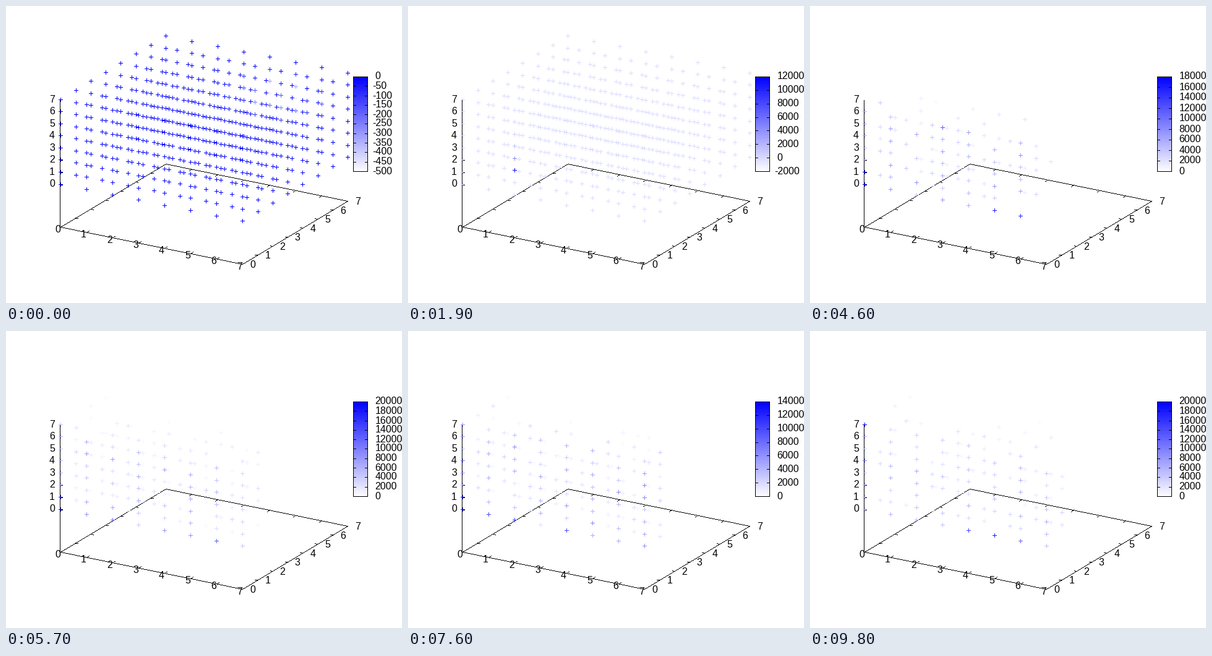
A matplotlib script for the animation above (9.9 s loop, 640 by 480 pixels).

```python
import math

import matplotlib.pyplot as plt
import numpy as np
from matplotlib.animation import FuncAnimation
from matplotlib.collections import LineCollection

W, H, DPI = 640, 480, 100
FRAMES, INTERVAL = 99, 100
N = 8
PX = 72 / DPI
FONT = dict(family="Liberation Sans", size=16 * PX, color="black", va="baseline")
X, Y, Z = np.indices((N, N, N))


def dip():
    """A small hollow near the back wall."""
    r2 = (X - 4.5) ** 2 + (Y - 7) ** 2 + (Z - 4.2) ** 2
    return np.where(r2 < 5, -560 * np.exp(-r2 / 1.6), 0)


def spike():
    """A column that fades upwards, with the hollow half filled."""
    column = (X == 2) & (Y == 0) & (Z >= 2)
    return .6 * dip() + np.where(column, 11600 * .38 ** (Z - 2.0), 0)


def cloud(seed, level, fade, low, high, hot):
    """Random cells thinning out with depth, plus (x, z, value) peaks in front."""
    rng = np.random.default_rng(seed)
    inside = (X >= low) & (X <= high) & (Z >= low) & (Z <= high) & (X + Y <= 8)
    filled = rng.random(X.shape) < .85 - .25 * Y
    field = level * fade ** Y * rng.uniform(.6, 1.4, X.shape) * (inside & filled)
    for x, z, value in hot:
        field[x, 0, z] = value
    return 1000 * field


STATES = [
    (0, dip()),
    (19, spike()),
    (29, cloud(1, 1.6, .6, 1, 6,
               [(3, 6, 8.9), (4, 6, 6.6), (3, 5, 3.6), (6, 3, 4.2), (6, 5, 4)])),
    (46, cloud(2, 5.5, .55, 0, 6,
               [(0, 0, 17.6), (0, 1, 17), (3, 6, 11.5), (5, 0, 16), (6, 0, 15)])),
    (67, cloud(3, 5.5, .5, 0, 7,
               [(0, 0, 17.8), (0, 1, 16.5), (1, 0, 13), (2, 0, 15), (4, 0, 12)])),
    (85, cloud(4, 3.2, .65, 0, 7,
               [(0, 4, 13.8), (1, 4, 8), (7, 5, 11), (7, 4, 8), (4, 0, 6)])),
    (98, cloud(5, 4.6, .55, 0, 7,
               [(0, 7, 19.6), (5, 0, 17.5), (4, 0, 15), (6, 0, 12), (0, 4, 10)])),
]
DELAY = np.random.default_rng(4).random(X.shape)


def field_at(n):
    """Blend neighbouring states, each cell with its own delay and flicker."""
    for (t0, a), (t1, b) in zip(STATES, STATES[1:]):
        if n <= t1:
            break
    u = (n - t0) / (t1 - t0)
    s = np.clip((u - .2 * DELAY) / .8, 0, 1)
    noise = np.random.default_rng(n).uniform(-1, 1, X.shape)
    return (a + (b - a) * s) * (1 + .25 * math.sin(math.pi * u) * noise)


def tic_step(span):
    power = 10 ** math.floor(math.log10(span))
    density = 20 / (span / power)
    for limit, step in ((40, .05), (20, .1), (10, .2), (4, .5), (1, 1)):
        if density > limit:
            return step * power
    return 2 * power


def pixel_line(x0, y0, x1, y1):
    """Segments that cover exactly the pixels of a one-pixel line."""
    if x0 == x1:
        return [[(x0 + .5, y0), (x0 + .5, y1 + 1)]]
    cols = np.arange(round(min(x0, x1)), round(max(x0, x1)) + 1)
    rows = np.floor(y0 + (cols - x0) * (y1 - y0) / (x1 - x0) + .5) + .5
    return [[(c, r), (c + 1, r)] for c, r in zip(cols, rows)]


fig = plt.figure(figsize=(W / DPI, H / DPI), dpi=DPI, facecolor="white")
ax = fig.add_axes([0, 0, 1, 1])


def add_segments(segments, zorder):
    group = LineCollection(segments, colors="black", linewidths=PX,
                           capstyle="butt", zorder=zorder)
    group.set_snap(False)
    return ax.add_collection(group, autolim=False)


def label(x, y, s, ha="center"):
    return ax.text(x - 1, y + 5.5, s, ha=ha, zorder=5, **FONT)


# Base frame and vertical axis
frame = []
for edge in ((88, 357, 382, 417), (382, 417, 552, 315),
             (88, 357, 258, 255), (258, 255, 552, 315), (87, 151, 87, 357)):
    frame += pixel_line(*edge)

for k in range(N):
    dx, dy = 42 * k, 60 * k / 7
    ex, ey = 170 * k / 7, -102 * k / 7
    if 0 < k < N - 1:
        frame += pixel_line(88 + dx, 357 + dy, 92 + dx, 354.6 + dy)
        frame += pixel_line(258 + dx, 255 + dy, 254 + dx, 257.4 + dy)
        frame += pixel_line(88 + ex, 357 + ey, 92 + ex, 357.8 + ey)
        frame += pixel_line(382 + ex, 417 + ey, 378 + ex, 416.2 + ey)
    row = round(287.55 - 19.55 * k) + (k < 3)
    frame += pixel_line(87, row, 91, row)
    label(84.5 + dx, 360 + dy, str(k))
    label(399.5 + ex, 417.5 + ey, str(k))
    label(75.5, 287 - 19.55 * k, str(k))
add_segments(frame, 1)

# Colour box
ramp = np.linspace(1, 0, 128)[:, None]
shades = np.dstack([1 - ramp, 1 - ramp, np.ones_like(ramp)])
ax.imshow(shades, extent=(561, 585, 268, 114), aspect="auto",
          interpolation="nearest", zorder=3)
box = []
for edge in ((561, 114, 584, 114), (561, 267, 584, 267),
             (561, 114, 561, 267), (584, 114, 584, 267)):
    box += pixel_line(*edge)
add_segments(box, 4)
tics = add_segments([], 4)

# Crosses: one horizontal and one vertical arm for each grid point
cx = np.round(88.25 + 42 * X + 24.26 * Y).ravel()
cy = np.round(287.55 + 8.5 * X - 14.65 * Y - 19.55 * Z).ravel()
across = np.stack([np.c_[cx - 3, cy + .5], np.c_[cx + 4, cy + .5]], axis=1)
down = np.stack([np.c_[cx + .5, cy - 3], np.c_[cx + .5, cy + 4]], axis=1)
crosses = add_segments(np.stack([across, down], axis=1).reshape(-1, 2, 2), 2)

ax.set_xlim(0, W)
ax.set_ylim(H, 0)
ax.axis("off")
scale_labels = []


def update(n):
    field = field_at(n)
    low, high = field.min(), field.max()
    step = tic_step(high - low)
    first, last = math.floor(low / step), math.ceil(high / step)
    shade = (field.ravel() / step - first) / (last - first)
    colors = np.ones((shade.size, 3))
    colors[:, :2] = 1 - shade[:, None]
    crosses.set_color(np.repeat(colors, 2, axis=0))

    while scale_labels:
        scale_labels.pop().remove()
    marks = []
    for k in range(first, last + 1):
        y = round(267 - 153 * (k - first) / (last - first))
        value = round(k * step)
        left = 593.5 if value < 0 else 597.5
        scale_labels.append(label(left, y - 1, str(value), "left"))
        marks += pixel_line(561, y, 565, y) + pixel_line(580, y, 584, y)
    tics.set_segments(marks)
    return [crosses, tics, *scale_labels]


anim = FuncAnimation(fig, update, frames=FRAMES, interval=INTERVAL,
                     repeat=True, repeat_delay=0, blit=False)
plt.show()
```
